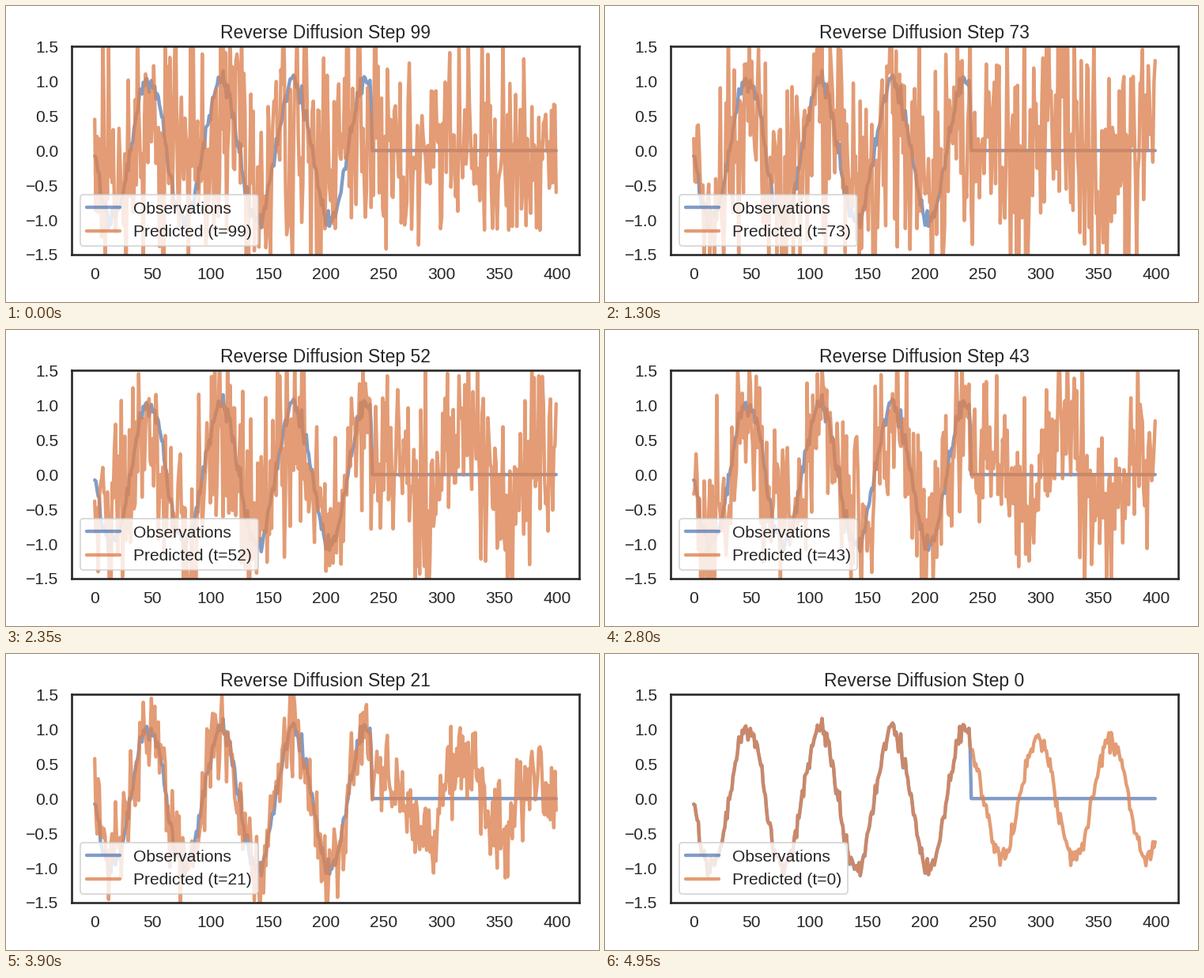
Animation of 750 by 375 pixels, one loop 8 s. Source, as a matplotlib script:

```python
import numpy as np
import matplotlib.pyplot as plt
from matplotlib.animation import FuncAnimation

W, H, DPI = 750, 375, 125
STEPS, HOLD, INTERVAL = 100, 60, 50
N, SEEN = 400, 240
BLUE, ORANGE, INK = "#4C72B0", "#DD8452", "#262626"

plt.rcParams.update({
    "font.family": "Liberation Sans",
    "text.color": INK,
    "axes.edgecolor": INK,
    "axes.linewidth": 1.5,
    "patch.linewidth": 1,
    "lines.linewidth": 2.5,
    "lines.solid_capstyle": "round",
})

rng = np.random.default_rng(12)
x = np.arange(N)


def smoothstep(u):
    u = np.clip(u, 0, 1)
    return u * u * (3 - 2 * u)


def make_series():
    """Noisy sine; the forecast part is a little flatter and smoother."""
    level = np.where(x < SEEN, 1.0, 0.85)
    spread = np.where(x < SEEN, 0.08, 0.065)
    return level * np.sin(0.1 * x + 3.22) + spread * rng.standard_normal(N)


def denoise(clean):
    """Reverse diffusion; row t holds the sample at step t."""
    beta = np.linspace(1e-4, 0.05, STEPS)
    alpha = 1 - beta
    abar = np.cumprod(alpha)
    # the forecast starts from a vague wave and settles late on the clean one
    early = 0.75 * np.cos(0.0967 * (x - 256))
    rows = np.empty((STEPS, N))
    z = 0.7 * rng.standard_normal(N)
    for t in range(STEPS - 1, -1, -1):
        keep, noise = np.sqrt(abar[t]), np.sqrt(1 - abar[t])
        # the known part is the clean series with fresh noise
        fresh = keep * clean + noise * rng.standard_normal(N)
        z = np.where(x < SEEN, fresh, z)
        rows[t] = z
        guess = early + smoothstep((32 - t) / 16) * (clean - early)
        eps = (z - keep * guess) / noise
        z = (z - beta[t] / noise * eps) / np.sqrt(alpha[t])
        z = z + np.sqrt(beta[t]) * rng.standard_normal(N)
    rows[0, SEEN:] = clean[SEEN:]
    return rows


clean = make_series()
observed = np.where(x < SEEN, clean, 0)
samples = denoise(clean)

fig = plt.figure(figsize=(W / DPI, H / DPI), dpi=DPI, facecolor="white")
left, right, top, bottom = 83, 725, 51.3, 315
ax = fig.add_axes([left / W, 1 - bottom / H,
                   (right - left) / W, (bottom - top) / H])
ax.plot(x, observed, color=BLUE, alpha=0.7, label="Observations")
line, = ax.plot(x, samples[-1], color=ORANGE, alpha=0.8,
                label="Predicted (t=99)")
ax.set_xlim(-19.95, 418.95)
ax.set_ylim(-1.5, 1.5)
ax.set_xticks(range(0, 401, 50))
ax.set_yticks(np.arange(-1.5, 1.6, 0.5))
ax.tick_params(length=6, pad=3.5, labelsize=12.1, labelcolor=INK,
               bottom=False, left=False)
title = ax.set_title("", fontsize=13.2, pad=6)
legend = ax.legend(loc="lower left", fontsize=12.1, framealpha=0.8,
                   facecolor="white", edgecolor="0.8")
caption = legend.get_texts()[1]


def update(i):
    t = max(STEPS - 1 - i, 0)
    line.set_ydata(samples[t])
    title.set_text(f"Reverse Diffusion Step {t}")
    caption.set_text(f"Predicted (t={t})")
    return line, title, caption


anim = FuncAnimation(fig, update, frames=STEPS + HOLD, interval=INTERVAL,
                     init_func=lambda: update(0), repeat=True,
                     repeat_delay=0, blit=False)
plt.show()
```
